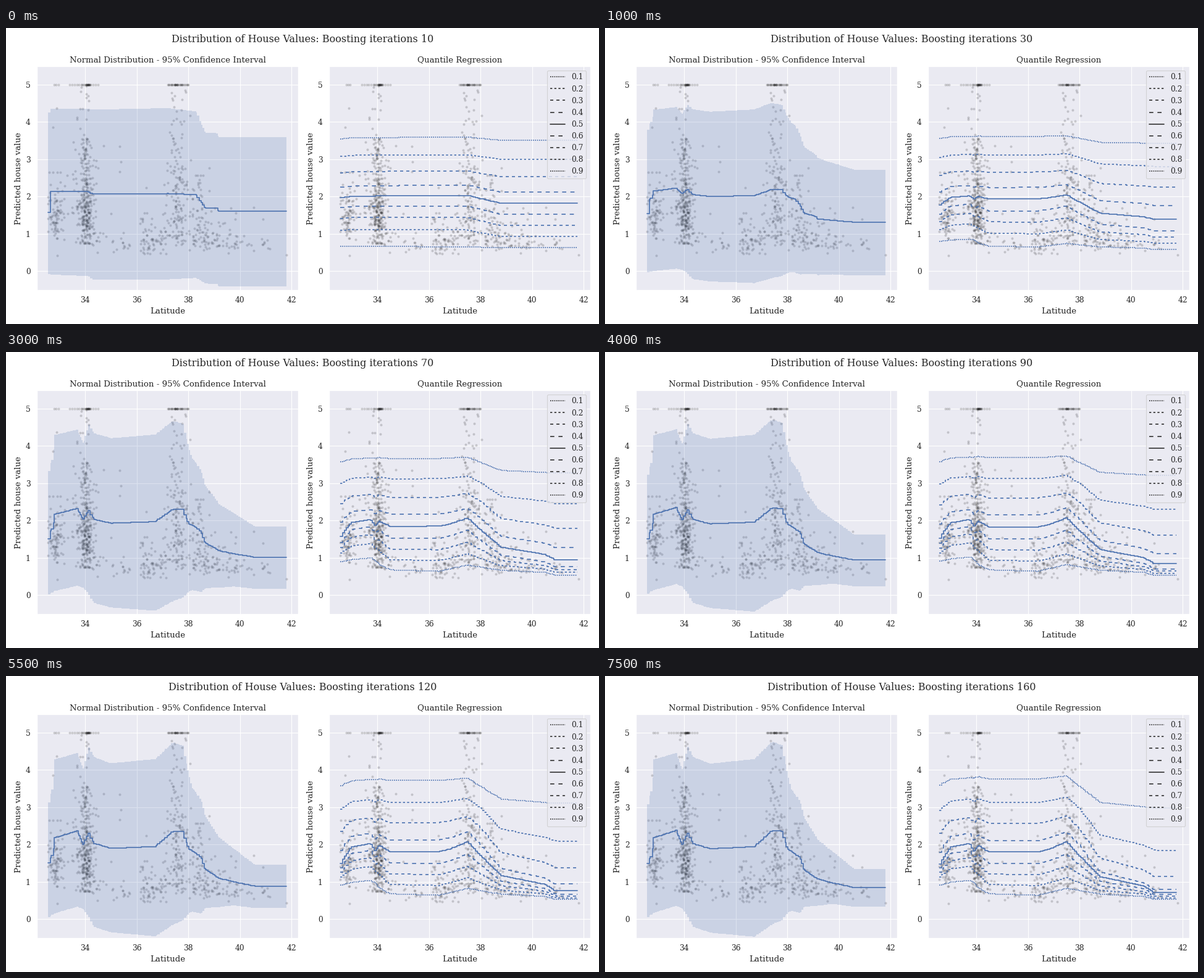
Animation of 960x480 px, one loop 8000 ms. Source, as a matplotlib script:

```python
import numpy as np
import matplotlib.pyplot as plt
from matplotlib.animation import FuncAnimation
from matplotlib.lines import Line2D
from matplotlib.patches import Polygon

W, H, DPI = 960, 480, 80
BLUE, INK = "#4c72b0", "0.15"
FRAMES, STEP = 16, 10

plt.rcParams.update({
    "font.family": "DejaVu Serif", "font.size": 12,
    "axes.titlesize": 12, "axes.labelsize": 12, "figure.titlesize": 14.4,
    "xtick.labelsize": 11, "ytick.labelsize": 11, "legend.fontsize": 11,
    "text.color": INK, "axes.labelcolor": INK,
    "xtick.color": INK, "ytick.color": INK,
    "axes.facecolor": "#eaeaf2", "axes.edgecolor": "white",
    "axes.linewidth": 1.25, "axes.axisbelow": True, "axes.grid": True,
    "grid.color": "white", "grid.linewidth": 1,
    "xtick.bottom": False, "ytick.left": False,
    "xtick.major.size": 6, "ytick.major.size": 6,
    "lines.linewidth": 1.5, "lines.solid_capstyle": "round",
})

# Key points: latitude, low, middle, high.
BAND_START = [
    (32.556, -.08, 1.57, 4.25), (32.60, -.09, 2.13, 4.36),
    (34.10, -.13, 2.13, 4.36), (34.30, -.22, 2.07, 4.33),
    (37.20, -.22, 2.08, 4.37), (38.30, -.18, 2.05, 4.28),
    (38.65, -.33, 1.70, 3.71), (39.10, -.34, 1.69, 3.70),
    (39.17, -.40, 1.61, 3.60)]
BAND_END = [
    (32.556, .06, 1.50, 3.08), (32.75, .14, 1.72, 3.50),
    (32.82, .17, 2.18, 4.28), (33.70, .36, 2.38, 4.46),
    (33.93, .28, 1.98, 3.99), (34.13, .08, 2.33, 4.64),
    (34.33, -.20, 2.03, 4.35), (35.00, -.36, 1.89, 4.17),
    (36.72, -.47, 1.94, 4.29), (37.40, -.14, 2.37, 4.76),
    (37.80, -.02, 2.36, 4.66), (38.00, .17, 1.88, 3.87),
    (38.15, .22, 1.82, 3.48), (38.50, .17, 1.65, 3.15),
    (38.65, .33, 1.32, 2.72), (39.17, .36, 1.08, 2.14),
    (39.75, .41, .97, 1.81), (40.59, .33, .85, 1.35)]
QUANT_START = [
    (32.57, .67, 1.97, 3.55), (33.10, .67, 2.01, 3.58),
    (37.50, .65, 2.03, 3.59), (38.80, .63, 1.82, 3.51)]
QUANT_END = [
    (32.57, .92, 1.47, 3.59), (33.00, .99, 1.93, 3.75),
    (33.75, 1.04, 2.03, 3.79), (33.92, .98, 1.80, 3.78),
    (34.08, .84, 1.98, 3.82), (34.50, .68, 1.80, 3.76),
    (36.40, .64, 1.80, 3.76), (36.85, .72, 1.88, 3.79),
    (37.50, .83, 2.08, 3.84), (37.90, .78, 1.78, 3.62),
    (38.80, .67, 1.14, 3.13), (40.50, .61, .89, 3.01),
    (40.90, .53, .71, 2.98)]


def shape(points, x):
    lats, *cols = zip(*points)
    return np.array([np.interp(x, lats, c) for c in cols])


def learned(it, tau):
    """Share of the way from the first to the last iteration."""
    span = (FRAMES - 1) * STEP
    return np.expm1(-(it - STEP) / tau) / np.expm1(-span / tau)


def spread(levels, i, a, b):
    """Curve of quantile i/10 between the low, middle and high ones."""
    low, mid, high = levels
    if i <= 5:
        return low + (mid - low) * ((i - 1) / 4) ** a
    return mid + (high - mid) * ((i - 5) / 4) ** b


def split_grid(start, end):
    """Random split latitudes and the sampling point of each leaf."""
    cuts = start + .02 + np.cumsum(rng.uniform(.02, .09, 300))
    edges = np.r_[start, cuts[cuts < end - .02], end]
    mids = (edges[:-1] + edges[1:]) / 2
    mids[0] = start
    return np.repeat(edges, 2)[1:-1], mids


def houses():
    # count, latitude range or centre and spread, median value, log spread
    clumps = [
        (85, 32.90, .20, 1.50, .30), (190, 34.05, .11, 1.95, .50),
        (140, 33.95, .24, 1.85, .45), (20, 34.50, .20, 1.30, .50),
        (110, 37.75, .22, 2.00, .55), (65, 37.45, .17, 2.50, .50),
        (75, 38.40, .24, 1.20, .40)]
    strips = [
        (14, 34.9, 35.9, .70, .20), (70, 36.1, 37.2, .85, .32),
        (50, 38.6, 39.9, .90, .33), (16, 39.8, 41.6, .75, .16)]
    lone = [(41.8, .44), (32.92, .32), (32.75, 3.86), (32.9, 4.37),
            (35.33, 3.35), (35.37, 2.93), (35.33, 2.67), (36.37, 2.24),
            (40.53, 1.71), (40.9, 1.4), (38.8, 2.77), (33.83, 4.82)]
    xs = [rng.normal(mid, sd, n) for n, mid, sd, *_ in clumps]
    xs += [rng.uniform(lo, hi, n) for n, lo, hi, *_ in strips]
    ys = [med * np.exp(np.clip(rng.normal(0, sig, n), -1.9 * sig, 1.9 * sig))
          for n, _, _, med, sig in clumps + strips]
    # Values capped at the top of the scale.
    caps = [(3, 32.8, 32.95), (6, 33.4, 33.85), (13, 34.02, 34.2),
            (3, 34.3, 34.5), (7, 37.25, 37.5), (7, 37.65, 37.95)]
    xs += [np.linspace(lo, hi, n) for n, lo, hi in caps]
    ys += [np.full(n, 5.0) for n, *_ in caps]
    x, y = np.r_[np.column_stack([np.concatenate(xs), np.concatenate(ys)]), lone].T
    return np.clip(x, 32.56, 41.8), np.clip(y, .42, 5)


rng = np.random.default_rng(7)
lat, value = houses()
band_x, band_mids = split_grid(32.556, 41.8)
quant_x, quant_mids = split_grid(32.57, 41.76)

fig, (ax1, ax2) = plt.subplots(1, 2, figsize=(W / DPI, H / DPI), dpi=DPI)
head = fig.suptitle("Boosting iterations")
for ax, title in ((ax1, "Normal Distribution - 95% Confidence Interval"),
                  (ax2, "Quantile Regression")):
    ax.scatter(lat, value, s=13, color="black", alpha=.17, linewidths=0, zorder=1)
    ax.set(xlim=(32.13, 42.25), ylim=(-.5, 5.485), xticks=range(34, 43, 2),
           yticks=range(6), xlabel="Latitude",
           ylabel="Predicted house value", title=title)

band = ax1.add_patch(Polygon([(33, 0), (34, 0), (34, 1)], facecolor=BLUE,
                             alpha=.2, linewidth=0, zorder=1.5))
mean_line, = ax1.plot([], [], color=BLUE)

dash = [(0, (n, n)) for n in (1, 2, 3, 4)]
styles = dash + ["-"] + dash[::-1]
quant_lines = [ax2.plot([], [], color=BLUE, ls=s)[0] for s in styles]
ax2.legend([Line2D([], [], color="0.2", ls=s) for s in styles],
           [f"0.{i}" for i in range(1, 10)], loc="upper right")
fig.tight_layout()

band_start, band_end = (shape(p, band_mids) for p in (BAND_START, BAND_END))
quant_start, quant_end = (shape(p, quant_mids) for p in (QUANT_START, QUANT_END))

# How unevenly the quantiles are spaced, by latitude.
start_bend = np.interp(quant_mids, [37.5, 38.8], [.8, 1]), 1.25
end_bend = (np.interp(quant_mids, [33.9, 34.5], [.7, 1.08]),
            np.interp(quant_mids, [38, 38.8, 41], [1.35, 2, 2.4]))


def update(frame):
    it = STEP * (frame + 1)
    head.set_text(f"Distribution of House Values: Boosting iterations {it}")

    curves = band_start + (band_end - band_start) * learned(it, 42)
    low, mean, top = np.repeat(curves, 2, axis=1)
    mean_line.set_data(band_x, mean)
    band.set_xy(np.column_stack([np.r_[band_x, band_x[::-1]],
                                 np.r_[top, low[::-1]]]))

    for i, line in enumerate(quant_lines, 1):
        k = learned(it, max(28, 42 * np.exp(.6 * (i - 5))))
        y = ((1 - k) * spread(quant_start, i, *start_bend)
             + k * spread(quant_end, i, *end_bend))
        line.set_data(quant_x, np.repeat(y, 2))
    return [head, band, mean_line, *quant_lines]


anim = FuncAnimation(fig, update, frames=FRAMES, interval=500, repeat=True,
                     repeat_delay=0, blit=False)
plt.show()
```
